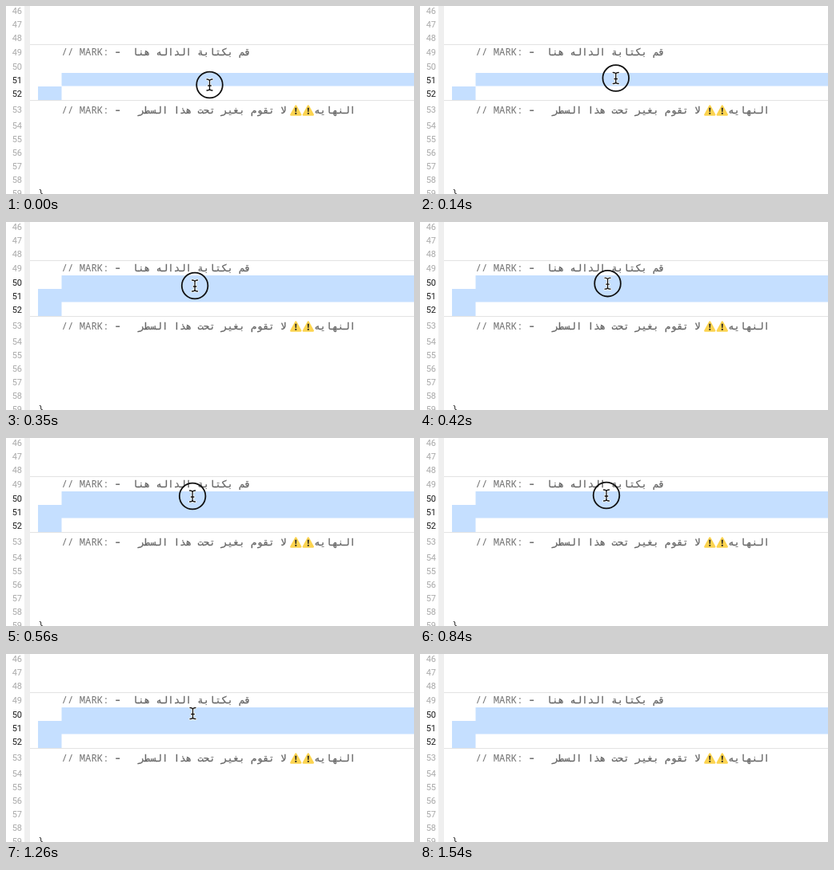
An HTML page that plays this animation: 510x236 px, repeating every 1610 ms.

```html
<!DOCTYPE html>
<html lang="ar">
<head>
<meta charset="utf-8">
<title>Code editor selection</title>
<style>
  html, body { margin: 0; width: 100%; height: 100%; overflow: hidden; background: #fff; }
  svg { display: block; width: 510px; height: 236px; }
  text { white-space: pre; }
  #numbers { font: 11px Roboto, sans-serif; fill: #a9a9a9; text-anchor: end; }
  #numbers .active { fill: #1c1c1c; }
  .code { font: 12.3px "Noto Sans Mono", monospace; fill: #737373; }
  .arabic { font: 12.3px "DejaVu Sans Mono", monospace; fill: #686868; stroke: #686868; stroke-width: .3; direction: rtl; }
  #selection { fill: #c5dfff; }
  #beam { fill: none; stroke-linecap: round; }
</style>
</head>
<body>
<svg viewBox="0 0 510 236">
  <defs>
    <path id="beam" d="M-3.5-7Q0-7 0-5V5Q0 7-3.5 7M3.5-7Q0-7 0-5M0 5Q0 7 3.5 7M-1.8 1H1.8"/>
    <g id="warning">
      <path d="M7.3 1.5 13.3 12.5H1.3Z" fill="#fcd450" stroke="#fcd450" stroke-width="2.4" stroke-linejoin="round"/>
      <path d="M6.2 3.8H8.4L7.9 8.9H6.7Z" fill="#2c2a24"/>
      <circle cx="7.3" cy="10.9" r="1.1" fill="#2c2a24"/>
    </g>
  </defs>
  <rect x="23" width="7" height="236" fill="#efefef"/>
  <path d="M30 48.5H510M30 118.5H510" stroke="#e3e3e3"/>
  <path id="selection"/>
  <g id="numbers"></g>
  <text class="code" x="69.5" y="62">// MARK: <tspan font-weight="700">–</tspan></text>
  <text class="arabic" x="306" y="62">قم بكتابة الداله هنا</text>
  <text class="code" x="69.5" y="135">// MARK: <tspan font-weight="700">–</tspan></text>
  <text class="arabic" x="437" y="135">النهايه</text>
  <use href="#warning" x="355" y="124"/>
  <use href="#warning" x="370.5" y="124"/>
  <text class="arabic" x="350.5" y="135">لا تقوم بغير تحت هذا السطر</text>
  <text class="code" x="40" y="239" style="fill:#333">}</text>
  <g id="cursor">
    <circle id="ring" r="16.3" fill="none" stroke="#111" stroke-width="1.8"/>
    <use href="#beam" stroke="#fff" stroke-width="3"/>
    <use href="#beam" stroke="#111" stroke-width="1.3"/>
  </g>
</svg>
<script>
const LOOP = 1610, STEP = 70, FIRST = 46, LAST = 59;
const $ = id => document.getElementById(id);
const progress = (time, start, end) => Math.max(0, Math.min(1, (time - start) / (end - start)));

// Lines that hold a MARK comment are taller
const lineHeight = line => line === 49 ? 18.6 : line === 53 ? 22.6 : 17.1;

const labels = [];
for (let line = FIRST, top = -2.5; line <= LAST; top += lineHeight(line++)) {
  const label = document.createElementNS("http://www.w3.org/2000/svg", "text");
  label.setAttribute("x", 20);
  label.setAttribute("y", top + lineHeight(line) / 2 + 4);
  label.textContent = line;
  labels.push($("numbers").appendChild(label));
}

// Drag up and settle, drift down slightly, then speed away downwards
function pointerAt(time) {
  const left = 1 - progress(time, 0, 630);
  const drift = progress(time, 840, 1260);
  const leave = progress(time, 1260, 1470) ** 2;
  return [
    233 + 21.5 * left ** 2.4 + 0.5 * drift + 13 * leave,
    72 + 27 * left ** 1.5 + 2.5 * drift + 120 * leave
  ];
}

function draw() {
  const time = Math.floor(performance.now() % LOOP / STEP) * STEP;
  const firstLine = time < 350 ? 51 : 50;
  const top = firstLine === 51 ? 84 : 67;
  $("selection").setAttribute("d", `M69.5 ${top}H510V100.6H69.5V118H40V${top + 17}H69.5Z`);
  labels.forEach((label, i) =>
    label.classList.toggle("active", i + FIRST >= firstLine && i + FIRST <= 52));
  $("cursor").setAttribute("transform", `translate(${pointerAt(time)})`);
  $("cursor").setAttribute("opacity", time < 1540 ? 1 : 0);
  $("ring").setAttribute("opacity", 1 - progress(time, 910, 1120));
  requestAnimationFrame(draw);
}
draw();
</script>
</body>
</html>
```
